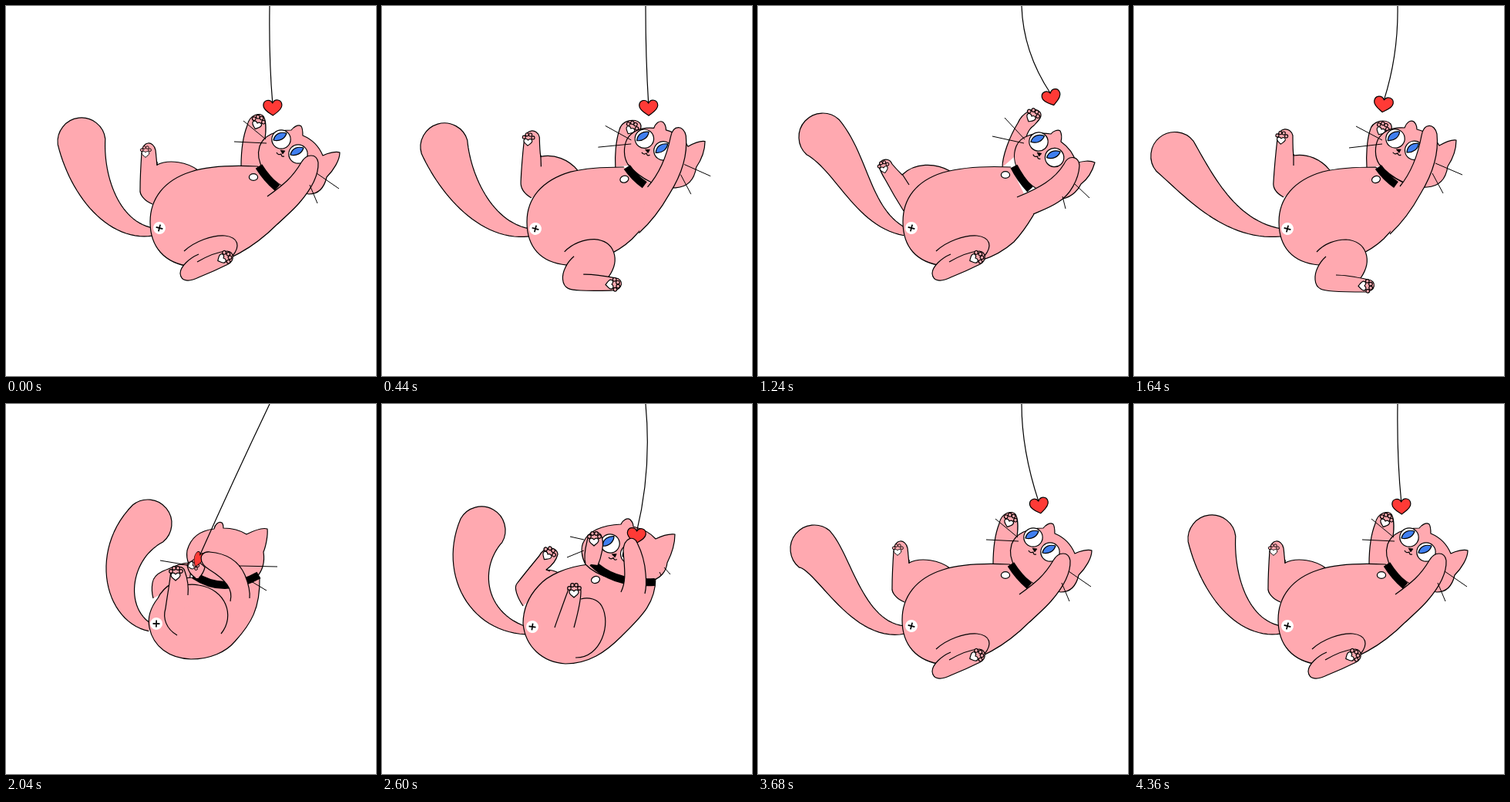
Recreate the animation shown at these times as an HTML page with a canvas. Size 480x480 px, loop 4400 ms.

```html
<!DOCTYPE html>
<html lang="en">
<head>
<meta charset="utf-8">
<title>Cat and heart</title>
<style>
html, body { margin: 0; width: 100%; height: 100%; overflow: hidden; background: #fff; }
canvas { display: block; width: 480px; height: 480px; }
</style>
</head>
<body>
<canvas id="stage"></canvas>
<script>
const LOOP = 4400, STEP = 40;
const PINK = '#ffa9b0', RED = '#ff3a36', BLUE = '#3f7ff0', INK = '#000', WHITE = '#fff';

// Outline of each part in the poses: a rest, b kick, c reach, d curl, e release.
const shapes = {
  farLeg: {
    a: 'M190 257C180 253 173 245 174 238C174 222 175 205 176 190C177 175 191 174 194 187C195 194 195 200 196 206C212 198 236 203 249 213',
    b: 'M194 248C183 242 180 235 181 228C182 210 184 190 186 172C187 157 203 156 206 168C206 178 206 188 207 194C225 191 243 199 254 213',
    c: 'M189 266C182 255 172 238 165 225C160 217 158 212 157 208C157 198 170 196 174 205C178 210 183 215 187 219C203 203 230 203 249 214',
    d: 'M191 252C189 245 189 238 190 232C191 224 197 220 203 217C210 214 218 211 225 208C232 206 236 206 240 206C240 212 240 220 238 228',
    e: 'M183 262C175 250 171 238 175 233C185 220 195 208 204 197C210 185 227 184 228 195C226 203 220 210 213 215C220 215 225 217 229 219'
  },
  crease: {
    a: 'M196 202L196 207', b: 'M207 192L207 207', c: 'M187 218L196 232', d: 'M200 240L200 240', e: 'M213 215L218 217'
  },
  farArm: {
    a: 'M305 208C305 190 307 170 313 155C316 140 330 138 334 143C338 150 337 165 336 172C336 185 334 195 330 208',
    b: 'M302 209C301 195 302 175 306 162C309 148 327 146 333 153C336 158 333 163 330 166C326 180 322 195 320 208',
    c: 'M317 209C317 195 326 170 337 152C343 138 359 130 366 138C370 144 362 150 358 155C350 160 347 170 345 185',
    d: 'M246 226C244 224 238 221 236 213C233 206 240 203 246 203C250 205 255 208 258 212C256 220 252 224 250 226',
    e: 'M264 207C262 200 263 190 266 178C268 165 282 163 285 172C288 180 286 190 284 197C283 203 281 206 280 209'
  },
  body: {
    a: 'M326 208C285 206 258 209 240 215C205 226 187 250 187 280C187 312 205 334 240 338C285 338 325 310 352 283C372 262 385 250 388 238Z',
    b: 'M313 209C285 209 262 211 245 215C207 226 188 250 188 280C188 312 205 333 240 336C275 334 305 320 324 302C343 282 362 258 369 240Z',
    c: 'M328 209C285 207 258 211 240 216C205 227 188 250 188 280C188 312 205 333 240 337C275 336 305 330 332 306C346 291 352 280 358 270C375 262 385 255 392 250Z',
    d: 'M243 225C225 225 205 235 197 252C186 266 184 280 186 290C191 315 212 330 240 331C265 331 285 322 297 308C318 285 330 265 329 225Z',
    e: 'M268 208C240 211 215 222 203 236C190 250 183 265 183 285C186 315 208 335 238 337C268 337 290 322 310 302C335 277 355 260 355 225Z'
  },
  collar: {
    a: 'M328 208Q338 224 352 236', b: 'M317 209Q326 222 340 232', c: 'M332 208Q340 224 353 238',
    d: 'M244 222Q282 248 328 222', e: 'M273 206Q300 234 354 231'
  },
  head: {
    a: 'M334 212C328 203 326 192 329 182C334 168 350 161 370 161C373 157 379 153 383 156C385 159 385 164 385 168C397 173 406 182 411 194C417 191 428 188 433 190C433 200 425 213 416 222C413 235 407 244 393 244C370 242 350 232 334 212Z',
    b: 'M318 205C312 196 312 182 317 172C325 160 338 157 351 158C353 152 358 147 363 150C366 153 367 158 367 160C379 163 390 170 396 181C403 177 412 173 418 174C418 188 413 199 407 208C405 222 398 234 380 235C360 236 335 225 318 205Z',
    c: 'M338 214C332 204 331 192 335 182C340 169 358 163 380 166C383 162 389 160 392 162C394 166 394 172 393 176C403 183 410 193 413 204C420 201 431 200 437 203C434 214 427 225 419 231C416 238 408 247 396 250C374 247 352 235 338 214Z',
    d: 'M250 222C238 214 233 202 235 190C240 172 252 164 270 162C271 156 276 152 280 154C282 156 282 159 282 161C293 161 304 164 312 169C322 164 332 160 339 162C340 170 337 185 334 192C336 205 333 216 325 225C305 240 268 236 250 222Z',
    e: 'M264 208C259 199 257 186 262 178C268 165 285 157 310 156C312 151 318 147 322 150C325 153 326 157 326 159C338 162 349 168 355 175C363 171 372 168 380 169C380 182 375 196 370 206C369 216 362 228 345 230C310 232 280 225 264 208Z'
  },
  nearArm: {
    a: 'M339 247C360 232 372 222 383 203C390 191 403 191 405 203C406 222 394 240 380 256C372 265 362 274 352 283',
    b: 'M345 234C358 218 368 195 373 168C376 151 390 152 393 166C396 195 386 220 372 243C360 265 346 283 332 296',
    c: 'M336 248C365 236 385 225 397 205C403 192 417 195 417 207C416 225 405 245 390 254C378 262 366 266 357 270',
    d: 'M291 256C295 240 285 228 264 215C249 206 250 191 264 192C290 194 303 206 310 222C314 232 317 242 316 252',
    e: 'M310 244C318 228 314 210 313 190C314 173 327 170 331 180C337 192 341 205 342 220C343 230 343 238 341 246'
  },
  thigh: {
    a: 'M231 318C245 305 268 297 284 298C302 300 304 312 294 324C280 330 260 335 245 340',
    b: 'M237 319C247 308 262 303 275 303C302 305 310 330 294 353C285 355 272 356 262 360',
    d: 'M213 244C225 234 240 233 250 235C285 240 298 275 279 298C279 298 279 298 279 298',
    e: 'M258 253C268 250 280 253 285 262C298 285 284 330 251 329C251 329 251 329 251 329'
  },
  shin: {
    a: 'M250 322C238 327 226 338 226 347C227 358 238 358 250 352C265 346 278 340 288 335C297 330 296 319 287 318C272 319 260 325 248 332',
    b: 'M249 325C240 333 234 345 235 355C236 368 245 369 258 370C272 371 286 371 300 371C314 371 315 356 304 355C290 352 276 349 262 349',
    d: 'M222 300C208 292 203 278 207 265C209 250 211 240 212 232C213 226 213 222 214 218C216 210 230 209 232 217C236 228 237 238 236 248',
    e: 'M224 290C228 278 232 268 234 262C237 254 239 248 241 243C241 240 242 239 243 238C247 233 258 236 258 243C258 258 253 275 249 290'
  },
  whiskers: {
    a: 'M308 149L337 173M296 176L338 178M403 217L432 237M394 232L404 256',
    b: 'M288 156L322 174M279 184L322 179M391 204L426 219M387 217L401 243',
    c: 'M320 145L346 173M304 169L345 178M411 231L430 249M395 247L399 263',
    d: 'M200 203L236 209M225 208L236 209M302 210L352 211M318 230L338 242',
    e: 'M244 172L262 176M240 199L262 190M366 212L374 221M360 218L362 222'
  }
};

// Small parts: x, y, degrees, scale.
const spots = {
  farHand: { a: [326, 152, 20, 1], b: [321, 160, 28, .95], c: [355, 143, 30, 1], d: [242, 209, 75, .8], e: [275, 176, 0, 1] },
  farFoot: { a: [181, 190, 0, .8], b: [191, 172, 5, .9], c: [163, 210, -15, .85], d: [230, 212, 40, 0], e: [215, 195, 35, 1] },
  nearFoot: { a: [282, 327, 65, 1], b: [299, 363, 88, 1], d: [220, 221, 0, 1], e: [249, 243, 0, 1] },
  face: { a: [357, 173, 0, 1], b: [339, 172, -9, 1], c: [364, 176, 4, 1], d: [262, 204, -15, 0], e: [296, 181, -13, 1] },
  tag: { a: [321, 222, 0, 1], b: [314, 225, -20, 1], c: [321, 219, 0, 1], d: [262, 236, 0, 0], e: [277, 228, -20, 1] },
  button: { a: [199, 288, 15, 1], b: [199, 289, 15, 1], d: [195, 285, 2, 1], e: [195, 289, 8, 1] }
};

const poseKeys = [[0, 'a'], [200, 'c'], [480, 'b'], [760, 'b'], [1000, 'c'], [1240, 'c'], [1520, 'b'], [1700, 'b'],
  [2000, 'd'], [2360, 'd'], [2600, 'e'], [2800, 'c'], [3000, 'a'], [LOOP, 'a']];

// time, then two control points and the centre of the tip
const tailKeys = [
  [0, 140, 293, 105, 235, 98, 176], [260, 128, 292, 84, 240, 63, 194], [500, 136, 292, 98, 230, 86, 180],
  [760, 134, 288, 88, 236, 80, 186], [900, 128, 290, 92, 228, 60, 194], [1240, 136, 275, 122, 205, 84, 170],
  [1460, 134, 284, 100, 220, 72, 184], [1720, 124, 292, 86, 236, 58, 194], [2040, 140, 272, 135, 195, 184, 155],
  [2320, 138, 274, 130, 198, 172, 157], [2600, 122, 282, 100, 215, 129, 164], [2900, 130, 292, 90, 224, 76, 184],
  [3360, 130, 294, 92, 224, 70, 188], [3680, 130, 297, 100, 210, 73, 188], [4080, 140, 285, 112, 215, 104, 170],
  [4360, 140, 293, 108, 234, 101, 175], [LOOP, 140, 293, 105, 235, 98, 176]
];
// time, heart centre, string control point, heart width
const heartKeys = [
  [0, 346, 132, 341, 70, 1], [240, 338, 132, 341, 65, 1], [480, 345, 132, 342, 65, 1], [640, 318, 129, 341, 65, 1],
  [760, 315, 128, 343, 70, 1], [1000, 352, 132, 342, 60, 1], [1240, 381, 119, 344, 60, 1], [1500, 330, 130, 342, 65, 1],
  [1700, 318, 132, 340, 65, 1], [2000, 251, 200, 296, 98, .5], [2080, 251, 200, 296, 98, .5], [2360, 252, 199, 298, 96, .5],
  [2600, 330, 171, 350, 85, 1], [2800, 366, 136, 344, 65, 1], [3050, 345, 133, 341, 65, 1], [3300, 328, 132, 342, 65, 1],
  [3680, 365, 132, 342, 60, 1], [4000, 360, 132, 342, 60, 1], [4360, 347, 133, 341, 70, 1], [LOOP, 346, 132, 341, 70, 1]
];

const numbers = d => d.match(/-?[\d.]+/g).map(Number);
const lerp = (p, q, k) => p.map((v, i) => v + (q[i] - v) * k);
const pick = (part, pose) => part[pose] || part.a;

function outline(name, [from, to, k]) {
  const d = pick(shapes[name], from);
  const v = lerp(numbers(d), numbers(pick(shapes[name], to)), k);
  let i = 0;
  return new Path2D(d.replace(/-?[\d.]+/g, () => v[i++].toFixed(2)));
}
const spot = (name, [from, to, k]) => lerp(pick(spots[name], from), pick(spots[name], to), k);

function poseAt(t) {
  const i = poseKeys.findIndex(key => key[0] > t) - 1;
  const [t0, from] = poseKeys[i], [t1, to] = poseKeys[i + 1];
  const k = (t - t0) / (t1 - t0);
  return [from, to, k * k * (3 - 2 * k)];
}

// Smooth track through keys, with slopes taken from the neighbours.
function track(keys, t) {
  const n = keys.length - 1;
  const i = keys.findIndex(key => key[0] > t) - 1;
  const p = keys[i], q = keys[i + 1];
  const before = i ? keys[i - 1] : keys[n - 1], after = i + 1 < n ? keys[i + 2] : keys[1];
  const tb = i ? before[0] : before[0] - LOOP, ta = i + 1 < n ? after[0] : after[0] + LOOP;
  const h = q[0] - p[0], s = (t - p[0]) / h, s2 = s * s, s3 = s2 * s;
  return p.slice(1).map((v, j) => {
    const w = q[j + 1];
    const m0 = (w - before[j + 1]) / (q[0] - tb) * h;
    const m1 = (after[j + 1] - v) / (ta - p[0]) * h;
    return v * (2 * s3 - 3 * s2 + 1) + m0 * (s3 - 2 * s2 + s) + w * (3 * s2 - 2 * s3) + m1 * (s3 - s2);
  });
}

const canvas = document.getElementById('stage');
const ctx = canvas.getContext('2d');
const ratio = window.devicePixelRatio || 1;
canvas.width = canvas.height = 480 * ratio;

const HEART = new Path2D('M0 -6C-3 -12 -12 -11 -12 -3C-12 3 -4 7 0 10C4 7 12 3 12 -3C12 -11 3 -12 0 -6Z');
const PAD = new Path2D('M0 0C-2 -3 -6 -2 -6 1C-6 4 -2 6 0 8C2 6 6 4 6 1C6 -2 2 -3 0 0Z');
const IRIS = new Path2D('M-10 1C-8 -8 0 -10 7 -8C5 -1 -2 3 -10 1Z');
const NOSE = new Path2D('M-1 14L5 15L2 19Z');
const MOUTH = new Path2D('M-6 17Q-4 21 0 19Q0 23 4 22');

function paint(path, fill, width = 1.2) {
  if (fill) { ctx.fillStyle = fill; ctx.fill(path); }
  ctx.lineWidth = width;
  ctx.strokeStyle = INK;
  ctx.stroke(path);
}
function oval(x, y, rx, ry = rx) {
  const p = new Path2D();
  p.ellipse(x, y, rx, ry, 0, 0, Math.PI * 2);
  return p;
}
function place(x, y, deg, sx, sy, draw) {
  ctx.save();
  ctx.translate(x, y);
  ctx.rotate(deg * Math.PI / 180);
  ctx.scale(sx, sy);
  draw();
  ctx.restore();
}

function paw(name, pose) {
  const [x, y, deg, size] = spot(name, pose);
  if (size < .05) return;
  place(x, y, deg, size, size, () => {
    paint(PAD, WHITE);
    for (const [tx, ty] of [[-6, -4], [-2, -8], [3, -8], [7, -4]]) paint(oval(tx, ty, 2.3), PINK);
  });
}

function tail(t, pose) {
  const [ax, ay, bx, by, tx, ty] = track(tailKeys, t);
  const [x, y] = spot('button', pose);
  const ox = x - 8, oy = y + 5, left = [], right = [], n = 28;
  let turn = 0;
  for (let i = 0; i <= n; i++) {
    const s = i / n, u = 1 - s;
    const at = (p, a, b, q) => u * u * u * p + 3 * u * u * s * a + 3 * u * s * s * b + s * s * s * q;
    const slope = (p, a, b, q) => u * u * (a - p) + 2 * u * s * (b - a) + s * s * (q - b);
    turn = Math.atan2(slope(oy, ay, by, ty), slope(ox, ax, bx, tx));
    const r = 5 + 26 * s, px = at(ox, ax, bx, tx), py = at(oy, ay, by, ty);
    const nx = Math.sin(turn) * r, ny = -Math.cos(turn) * r;
    left.push([px + nx, py + ny]);
    right.unshift([px - nx, py - ny]);
  }
  const p = new Path2D();
  left.forEach(q => p.lineTo(...q));
  p.arc(tx, ty, 31, turn - Math.PI / 2, turn + Math.PI / 2);
  right.forEach(q => p.lineTo(...q));
  paint(p, PINK);
}

function face(pose) {
  const [x, y, deg, open] = spot('face', pose);
  place(x, y, deg, 1, 1, () => {
    for (const [ex, ey] of [[0, 0], [22, 19]]) {
      ctx.save();
      ctx.translate(ex, ey);
      if (open > .4) {
        paint(oval(0, 0, 12.2), WHITE);
        paint(IRIS, BLUE);
      } else {
        const lid = new Path2D();
        lid.arc(0, 0, 12, Math.PI * 1.15, Math.PI * 1.85);
        paint(lid);
      }
      ctx.restore();
    }
    if (open > .4) {
      paint(NOSE, INK, .6);
      paint(MOUTH);
    }
  });
}

function heart(t) {
  const [x, y, cx, cy, width] = track(heartKeys, t);
  const deg = Math.max(-16, Math.min(22, (342 - x) * .45));
  const a = deg * Math.PI / 180;
  const line = new Path2D();
  line.moveTo(342, 0);
  line.quadraticCurveTo(cx, cy, x + 6 * Math.sin(a), y - 6 * Math.cos(a));
  paint(line);
  place(x, y, deg, width, 1, () => paint(HEART, RED));
}

function farArm(pose) {
  paint(outline('farArm', pose), PINK);
  paw('farHand', pose);
}

function draw(t) {
  const pose = poseAt(t);
  const armInFront = t > 1850 && t < 2700;
  ctx.setTransform(ratio, 0, 0, ratio, 0, 0);
  ctx.fillStyle = WHITE;
  ctx.fillRect(0, 0, 480, 480);
  ctx.lineJoin = 'round';

  tail(t, pose);
  paint(outline('farLeg', pose), PINK);
  paint(outline('crease', pose));
  paw('farFoot', pose);
  if (!armInFront) farArm(pose);
  paint(outline('body', pose), PINK);

  const [bx, by, turn] = spot('button', pose);
  place(bx, by, turn, 1, 1, () => {
    ctx.fillStyle = WHITE;
    ctx.fill(oval(0, 0, 8));
    paint(new Path2D('M-4.5 0H4.5M0 -4.5V4.5'), null, 1.7);
  });

  paint(outline('head', pose), PINK);
  paint(outline('collar', pose), null, 10);
  const [gx, gy, tilt, size] = spot('tag', pose);
  if (size > .05) place(gx, gy, tilt, size, size, () => paint(oval(0, 0, 5.6, 4.4), WHITE));
  face(pose);
  if (armInFront) farArm(pose);

  heart(t);
  paint(outline('nearArm', pose), PINK);
  paint(outline('thigh', pose), PINK);
  paint(outline('shin', pose), PINK);
  paw('nearFoot', pose);
  paint(outline('whiskers', pose), null, 1);
}

const start = performance.now();
function tick() {
  const t = (performance.now() - start) % LOOP;
  draw(Math.floor(t / STEP) * STEP);
  requestAnimationFrame(tick);
}
tick();
</script>
</body>
</html>
```
